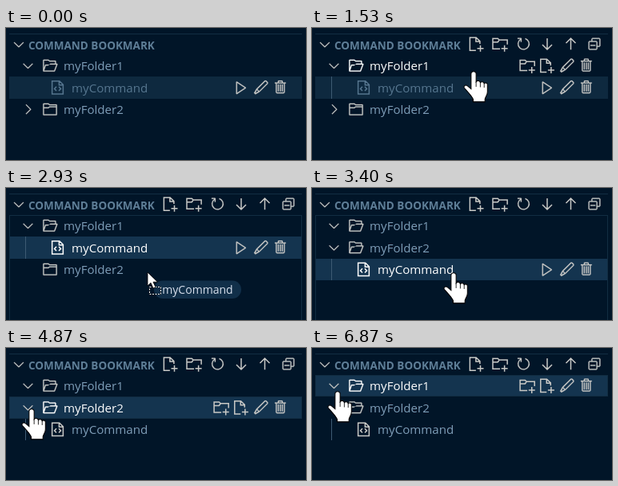
Recreate the animation shown at these times as an HTML page. Size 375 px wide and 166 px high, loop 8190 ms.

```html
<!DOCTYPE html>
<html lang="en">
<head>
<meta charset="utf-8">
<title>Command tree drag and drop</title>
<style>
  html, body { margin: 0; width: 100%; height: 100%; overflow: hidden; background: #011528; }
  svg { display: block; }
  text { font: 15.1px "Open Sans", "Noto Sans", sans-serif; }
  .head { font-weight: 700; font-size: 13.5px; }
  .chip { font-size: 14px; }
</style>
</head>
<body>
<svg id="stage" width="375" height="166" viewBox="0 0 375 166"></svg>
<script>
const LOOP = 8190, STEP = 200 / 3;
const ROW_TOP = 33.5, ROW_H = 27.5;
const BG = '#011528', EDGE = '#122d42', DIM = '#5f7e97', TEXT = '#7f9eb8', ICON = '#c9c9c6', LIGHT = '#d6deeb';

// Icons on a 16 unit grid: filled outlines, or plain strokes.
const FILLED = {
  down: 'M7.976 10.072l4.357-4.357.62.618L8.284 11h-.618L3 6.333l.619-.618z',
  right: 'M10.072 8.024L5.715 3.667l.618-.62L11 7.716v.618L6.333 13l-.618-.619z',
  opened: 'M1.5 14h11l.48-.37 2.63-7-.48-.63H14V3.5l-.5-.5H7.71l-.86-.85L6.5 2h-5l-.5.5v11zM2 3h4.29l.86.85.35.15H13v2H8.5l-.35.15-.86.85H3.5l-.47.34-1.03 3.08zM12.13 13H2.19l1.67-5H6l.35-.15.86-.85h7.17z',
  closed: 'M14.5 3H7.71l-.85-.85L6.51 2h-5l-.5.5v11l.5.5h13l.5-.5v-10zM14 13H2V7h4.49l.35-.15.86-.86H14zM14 5H7.5l-.35.15-.86.86H2V3h4.29l.85.85.36.15H14z',
  refresh: 'M4.681 3H2V2h3.5l.5.5V6H5V4a5 5 0 1 0 4.53-.761l.302-.954A6 6 0 1 1 4.681 3z',
  collapse: 'M9 9H4v1h5zM5 3l1-1h7l1 1v7l-1 1h-2v2l-1 1H3l-1-1V6l1-1h2zM6 5h4l1 1v4h2V3H6zM10 6H3v7h7z',
  play: 'M3.78 2L3 2.41v12l.78.42 9-6V8zM4 13.48V3.35l7.6 5.07z',
  edit: 'M13.23 1h-1.46L3.52 9.25l-.16.22L1 13.59 2.41 15l4.12-2.36.22-.16L15 4.23V2.77zM2.41 13.59l1.51-3 1.45 1.45zM6.24 11.53L4.47 9.76l8-8 1.77 1.77z',
  trash: 'M10 3h3v1h-1v9l-1 1H4l-1-1V4H2V3h3V2a1 1 0 0 1 1-1h3a1 1 0 0 1 1 1zM9 2H6v1h3zM4 13h7V4H4zM6 5H5v7h1zM7 5h1v7H7zM9 5h1v7H9z'
};
const STROKED = {
  newFile: 'M7.5 14.5h-6v-13h6.2l3.8 3.8v2.7M7.5 1.5v4h4M12 9.3v6.4M8.8 12.5h6.4',
  newFolder: 'M8 13H.8V2.5h5L7.3 4h8v4.5M.8 6.2h5L7.3 4M12.5 9.3v6.4M9.3 12.5h6.4',
  arrowDown: 'M8 2.3v11M3.2 8.8L8 13.6l4.8-4.8',
  arrowUp: 'M8 13.7v-11M3.2 7.2L8 2.4l4.8 4.8',
  code: 'M2.5 1.5h7.3l3.7 3.7v9.3h-11zM9.5 1.5v4h4M6.8 7.2L4.8 9.3l2 2.1M9.2 7.2l2 2.1-2 2.1'
};
const HAND = 'M10 21.5V3.7a3 3 0 0 1 6 0V13a2.8 2.8 0 0 1 5 1 2.7 2.7 0 0 1 4.6 1 2.3 2.3 0 0 1 3.9 2v8c0 4-2.5 6-3 9v3h-14v-3C11 30 6 25 2 20.5c-1.5-2 1-4.5 3.5-2.8z';
const HEAD_ICONS = ['newFile', 'newFolder', 'refresh', 'arrowDown', 'arrowUp', 'collapse'];
const FOLDER_ACTIONS = ['newFolder', 'newFile', 'edit', 'trash'];
const COMMAND_ACTIONS = ['play', 'edit', 'trash'];

// Pointer tip: [step, x, y], linear in between.
const PATH = [
  [14, 226, 13], [23, 202, 54], [26, 197, 72], [27, 194, 76], [31, 194, 76],
  [32, 193, 81], [37, 185, 94], [44, 177, 106], [62, 177, 106], [63, 152, 105],
  [66, 92, 87], [69, 32, 76], [85, 32, 76], [88, 32, 62], [92, 32, 54]
];

function tipAt(k) {
  const i = PATH.findIndex(p => p[0] > k);
  if (i < 0) return PATH[PATH.length - 1].slice(1);
  const [a, ax, ay] = PATH[i - 1], [b, bx, by] = PATH[i];
  const u = (k - a) / (b - a);
  return [ax + (bx - ax) * u, ay + (by - ay) * u];
}

const within = (k, from, to) => k >= from && k < to;

function icon(name, x, y, color) {
  const paint = FILLED[name]
    ? `fill="${color}" fill-rule="evenodd" stroke="${color}" stroke-width=".15"`
    : `fill="none" stroke="${color}" stroke-width="1.2"`;
  return `<path transform="translate(${x - 10} ${y - 10}) scale(1.25)" ${paint} d="${FILLED[name] || STROKED[name]}"/>`;
}

const label = (str, x, y, color, cls = '') =>
  `<text x="${x}" y="${y}" fill="${color}" class="${cls}">${str}</text>`;

const rect = (x, y, w, h, attrs) =>
  `<rect x="${x}" y="${y}" width="${w}" height="${h}" ${attrs}/>`;

const frame = (x, y, w, h, color, fill = 'none') =>
  rect(x + 0.5, y + 0.5, w - 1, h - 1, `fill="${fill}" stroke="${color}"`);

function treeRows(k) {
  const first = { id: 'a', name: 'myFolder1', open: !within(k, 95, 102) };
  const second = {
    id: 'b', name: 'myFolder2',
    open: k >= 46 && !within(k, 74, 82),
    noChevron: within(k, 44, 46)
  };
  const command = { id: 'c', name: 'myCommand', leaf: true };
  if (k < 50) return [first, command, second];
  return second.open ? [first, second, command] : [first, second];
}

function guideOpacity(k) {
  if (k < 14) return 0;
  return within(k, 45, 50) ? Math.max(0, (47 - k) / 3) : 1;
}

function drawRow(row, i, k, selected, hovered) {
  const top = Math.round(ROW_TOP + ROW_H * i);
  const height = Math.round(ROW_TOP + ROW_H * (i + 1)) - top;
  const mid = ROW_TOP + ROW_H * (i + 0.5);
  const active = selected && k >= 32;
  let color = TEXT, tint = ICON, out = '';
  if (active || (hovered && !selected)) color = tint = '#fff';
  else if (selected) color = tint = '#56768f';

  if (selected) out += rect(4, top, 366, height, `fill="${active ? '#14344f' : '#0e293f'}"`);
  if (selected && k >= 73) out += frame(4, top, 366, height, EDGE);
  if (row.leaf) {
    out += rect(24, top, 1, height, `fill="#3d5a72" opacity="${guideOpacity(k)}"`);
    out += icon('code', 64.5, mid, tint);
  } else {
    if (!row.noChevron) out += icon(row.open ? 'down' : 'right', 27.5, mid, ICON);
    out += icon(row.open ? 'opened' : 'closed', 55, mid, tint);
  }
  out += label(row.name, row.leaf ? 82 : 72, Math.round(mid + 5.9), color);
  if (selected || hovered) {
    const acts = row.leaf ? COMMAND_ACTIONS : FOLDER_ACTIONS;
    acts.forEach((name, n) => {
      out += icon(name, 343.5 - 24.8 * (acts.length - 1 - n), mid, ICON);
    });
  }
  return out;
}

function drawTooltip(opacity) {
  return `<g opacity="${opacity}">` + frame(82, 116, 118, 36, DIM, BG) +
    label('myCommand', 93, 140, LIGHT) + '</g>';
}

function drawHand(x, y) {
  return `<g transform="translate(${x} ${y}) scale(1.05) translate(-13 0)" stroke="#000">` +
    `<path d="${HAND}" fill="#fff"/>` +
    '<path d="M16 13v6M21 14v5.5M25.6 15v5" fill="none" stroke-width=".8"/></g>';
}

function drawDrag(x, y) {
  return `<g transform="translate(${x} ${y})">` +
    rect(8, 10.5, 109, 22.5, 'rx="11" fill="#14344f" opacity=".85"') +
    label('myCommand', 18.3, 27, LIGHT, 'chip') +
    rect(2.5, 18.5, 14, 9, 'fill="none" stroke="#000"') +
    rect(2.5, 18.5, 14, 9, 'fill="none" stroke="#fff" stroke-dasharray="2 1.5"') +
    '<path d="M0 0v17l4-3.7 3 6.7 3-1.3-3-6.5h5.5z" fill="#fff" stroke="#000" stroke-width=".8"/></g>';
}

function scene(k) {
  const shown = k >= 14, dragging = within(k, 32, 49);
  const [x, y] = shown ? tipAt(k) : [0, 0];
  const hover = shown && !dragging ? Math.floor((y - ROW_TOP) / ROW_H) : -1;
  const selected = k < 73 ? 'c' : k < 94 ? 'b' : 'a';

  let out = rect(0, 0, 375, 166, `fill="${BG}"`) + rect(4, 7, 366, 1, `fill="${EDGE}"`);
  out += icon('down', 16, 20.5, ICON) + label('COMMAND BOOKMARK', 28, 27, DIM, 'head');
  if (shown) HEAD_ICONS.forEach((name, n) => { out += icon(name, 205.5 + 29.5 * n, 20, ICON); });
  treeRows(k).forEach((row, i) => { out += drawRow(row, i, k, row.id === selected, i === hover); });
  // Focus ring around the whole tree, its lower edge outside the stage.
  if (within(k, 32, 73)) out += frame(4, 34, 366, 140, EDGE);
  if (within(k, 59, 65)) out += drawTooltip(k === 59 || k === 64 ? 0.5 : 1);
  if (shown) out += dragging ? drawDrag(x, y) : drawHand(x, y);
  return out;
}

const stage = document.getElementById('stage');
let last = -1;
function tick() {
  const k = Math.floor((performance.now() % LOOP + 5) / STEP);
  if (k !== last) stage.innerHTML = scene(last = k);
  requestAnimationFrame(tick);
}
tick();
</script>
</body>
</html>
```
